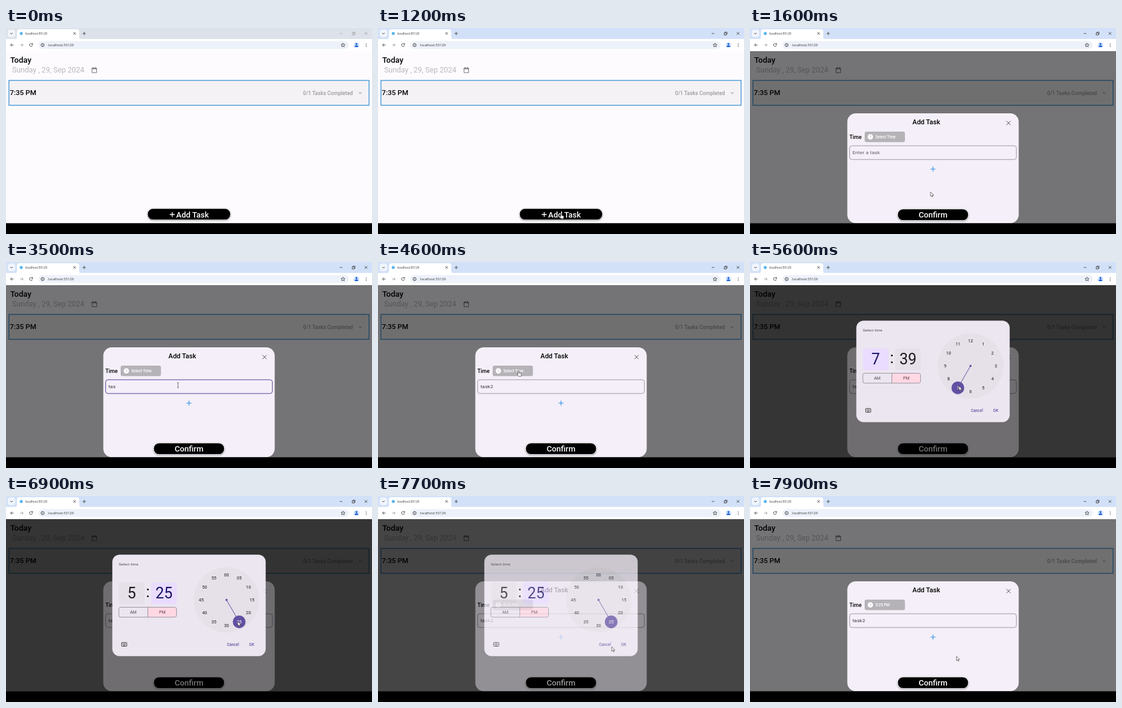
These frames come from a looping animation (600x338 px, 8 s). An HTML page:

```html
<!DOCTYPE html>
<html lang="en">
<head>
<meta charset="utf-8">
<style>
  html, body { margin: 0; width: 100%; height: 100%; overflow: hidden; background: #000; }
  svg { display: block; width: 600px; height: 338px; font-family: Roboto, sans-serif; }
  .medium { font-weight: 500; }
  .mid { text-anchor: middle; }
  .ui { font-family: "Open Sans", sans-serif; fill: #333; }
  .line { fill: none; stroke: #444; stroke-width: .9; }
  .field { font-size: 8px; letter-spacing: .25px; }
  .big { font-size: 25px; text-anchor: middle; }
  #dial text { font-size: 7.3px; text-anchor: middle; }
</style>
</head>
<body>
<svg viewBox="0 0 600 338">
  <defs>
    <clipPath id="page"><rect y="38" width="600" height="282.5"/></clipPath>
    <filter id="shadow" x="-10%" y="-30%" width="120%" height="170%">
      <feDropShadow dx="0" dy=".8" stdDeviation=".9" flood-opacity=".45"/>
    </filter>
  </defs>

  <!-- Browser window -->
  <rect id="strip" width="600" height="19"/>
  <rect x="3" y="2.5" width="12" height="12.5" rx="4" fill="#fff" fill-opacity=".65"/>
  <path class="line" d="M7 8l2 2 2-2"/>
  <path d="M14 18.5q4 0 4-4v-8.500q0-4 4-4h94q4 0 4 4v8.500q0 4 4 4z" fill="#fff"/>
  <circle cx="25" cy="9" r="2.500" fill="#52b4ee"/>
  <text class="ui" x="31.500" y="10.800" font-size="4.950">localhost:55129</text>
  <path class="line" d="M110.500 7l3.800 3.800m0-3.800l-3.800 3.800M125.500 9h5.400m-2.700-2.700v5.400"/>
  <g id="windowButtons" fill="none" stroke-width=".7">
    <path d="M547 9h4.500M588 6.700l4.400 4.400m0-4.400l-4.400 4.400"/>
    <path d="M567.500 8h3.500v3.500h-3.500zM568.700 8v-1.200h3.500v3.500h-1.200"/>
  </g>
  <rect y="18" width="600" height="20.500" fill="#fff"/>
  <rect x="53" y="21.500" width="509" height="13" rx="6.500" fill="#edf1f9"/>
  <path class="line" d="M12.500 28h-5m2.300-2.400l-2.400 2.400 2.400 2.400"/>
  <path class="line" stroke-opacity=".5" d="M23 28h5m-2.300-2.400l2.400 2.400-2.400 2.400"/>
  <path class="line" d="M43.300 26.600a2.500 2.500 0 1 0 .2 2M43.700 25v2h-2"/>
  <circle class="line" cx="60" cy="28" r="2.600" stroke-width=".6"/>
  <path class="line" stroke-width=".7" d="M60 27.500v2M60 26.200v.6"/>
  <text class="ui" x="69" y="30" font-size="5.750">localhost:55129</text>
  <path class="line" stroke-width=".7" d="M552.500 24.800l.9 2.100 2.300.2-1.700 1.500.5 2.300-2-1.200-2 1.200.5-2.300-1.700-1.500 2.300-.2z"/>
  <circle cx="574.500" cy="28" r="4.800" fill="#d3e3fd"/>
  <circle cx="574.500" cy="26.300" r="1.500" fill="#0b57d0"/>
  <path d="M571.500 31q0-2.500 3-2.500t3 2.500z" fill="#0b57d0"/>
  <path d="M590.500 25.400v6" stroke="#444" stroke-width="1.200" stroke-dasharray="1.100 1.200"/>

  <!-- Task list -->
  <g clip-path="url(#page)">
    <rect y="38" width="600" height="283" fill="#fefbff"/>
    <text class="medium" x="7" y="56.700" font-size="13">Today</text>
    <text x="10" y="73.300" font-size="12.200" fill="#bbb9bc">Sunday , 29, Sep 2024</text>
    <path d="M141 66h7.600v7.300h-7.600z" fill="none" stroke="#777"/>
    <path d="M140.500 66.800h8.600M142.800 64.300v2M146.800 64.300v2" fill="none" stroke="#777" stroke-width="1.500"/>
    <rect x="4.800" y="86" width="590.400" height="40.800" fill="#f5f2f5" stroke="#4a9bd6" stroke-width="1.400"/>
    <text class="medium" x="6.300" y="110.200" font-size="11.600">7:35 PM</text>
    <text class="medium" x="487" y="109.500" font-size="8.600" fill="#9b999c">0/1 Tasks Completed</text>
    <path d="M578.500 105.500l2.200 2.200 2.200-2.200" fill="none" stroke="#777"/>
    <rect x="232" y="296.300" width="136" height="18.500" rx="9" stroke="#e2e0e2" stroke-width=".8" filter="url(#shadow)"/>
    <path d="M268.500 306h8m-4-4v8" stroke="#fff" stroke-width="1.300"/>
    <text class="medium" x="279" y="310.700" font-size="13" fill="#fff">Add Task</text>
    <rect id="sheetScrim" y="38" width="600" height="283"/>

    <!-- New task sheet -->
    <g id="sheet">
      <rect x="159.500" y="140" width="281" height="180.300" rx="14" fill="#f4eff8"/>
      <text class="medium mid" x="289" y="157.800" font-size="11">Add Task</text>
      <path class="line" d="M420.500 152.700l6.600 6.600m0-6.600l-6.600 6.600"/>
      <text class="medium" x="163" y="181.800" font-size="8.800">Time</text>
      <rect x="188" y="170" width="66" height="17.300" rx="3" fill="#b6b3b8"/>
      <circle cx="197.300" cy="178.600" r="4.400" fill="#fff"/>
      <path d="M197.300 176v2.800l1.700 1.200" fill="none" stroke="#b6b3b8" stroke-width=".8"/>
      <text id="chosenTime" class="medium" x="205.500" y="180.900" font-size="6.300" fill="#fff"></text>
      <rect id="fieldBox" x="163.300" y="193.200" width="273.400" height="22.600" rx="4" fill="none"/>
      <text id="fieldText" class="field" x="168" y="207.400"></text>
      <rect id="caret" y="199.500" width=".9" height="10" fill="#6750a4"/>
      <path d="M296 231.500h8m-4-4v8" stroke="#3293e6" stroke-width="1.200"/>
      <rect x="242" y="297" width="116" height="18.800" rx="9" stroke="#fff" stroke-width=".8" filter="url(#shadow)"/>
      <text class="medium mid" x="300" y="311.400" font-size="13.200" fill="#fff">Confirm</text>
    </g>

    <!-- Time picker -->
    <g id="picker">
      <rect y="38" width="600" height="283" fill-opacity=".54"/>
      <rect x="174.300" y="96.300" width="251.400" height="166.400" rx="12" fill="#ece6f0"/>
      <text x="185" y="113.500" font-size="6.200" letter-spacing=".1" fill="#49454f">Select time</text>
      <rect id="hourBox" x="185" y="142" width="42" height="35.500" rx="3.500"/>
      <rect id="minuteBox" x="238" y="142" width="42" height="35.500" rx="3.500"/>
      <text id="hour" class="big" x="206" y="168.300"></text>
      <text class="big" x="232.500" y="165.500">:</text>
      <text id="minute" class="big" x="259" y="168.300"></text>
      <path d="M232.500 182.500h44q3 0 3 3v10q0 3-3 3h-44z" fill="#ffd8e4"/>
      <rect x="185" y="182.500" width="94.500" height="16.300" rx="3" fill="none" stroke="#79747e" stroke-width=".7"/>
      <path d="M232.500 182.500v16.300" stroke="#79747e" stroke-width=".7"/>
      <text class="mid" x="208.500" y="193.200" font-size="7" fill="#49454f">AM</text>
      <text class="mid" x="256.300" y="193.200" font-size="7" fill="#633b48">PM</text>
      <circle cx="361.500" cy="170.500" r="53.700" fill="#e6e0e9"/>
      <path id="hand" stroke="#6250a3"/>
      <circle cx="361.500" cy="170.500" r="1.800" fill="#6250a3"/>
      <circle id="knob" r="10.500" fill="#6250a3"/>
      <g id="dial"></g>
      <rect x="189.500" y="240.300" width="8.500" height="6.300" rx=".8" fill="none" stroke="#333" stroke-width=".9"/>
      <path d="M191 242.200h5.600M191 243.700h5.600" stroke="#333" stroke-dasharray=".9 .6"/>
      <path d="M192 245.300h3.600" stroke="#333" stroke-width=".8"/>
      <rect id="okHover" x="391.500" y="235" width="22" height="17" rx="8.500" fill="#6750a4" fill-opacity=".08"/>
      <g class="medium mid" font-size="6.400" fill="#6750a4">
        <text x="372" y="245.700">Cancel</text>
        <text x="402.800" y="245.700">OK</text>
      </g>
    </g>
  </g>
  <rect y="320.500" width="600" height="18"/>

  <g id="pointer" stroke="#222" stroke-width=".6" stroke-linejoin="round">
    <path id="arrow" fill="#fff" d="M0 0v7.200l1.700-1.500 1.100 2.500 1.200-.5-1.100-2.500h2.300z"/>
    <path id="finger" fill="#fff" d="M-.8.5q.8-1 1.600 0v3l3 .7q.9.300.8 1.300l-.6 3.500h-4l-2.600-3.500q.4-1 1.800 0z"/>
    <path id="beam" fill="none" d="M-1.300-4h2.600M0-4v8M-1.300 4h2.600"/>
  </g>
</svg>

<script>
const LOOP = 8000;
const $ = id => document.getElementById(id);
const set = (id, attrs) => {
  for (const key in attrs) $(id).setAttribute(key, attrs[key]);
};
const write = (id, text) => {
  if ($(id).textContent !== text) $(id).textContent = text;
};
const show = (id, on) => set(id, { visibility: on ? "visible" : "hidden" });
const progress = (t, from, to) => Math.min(1, Math.max(0, (t - from) / (to - from)));
const smooth = p => p * p * (3 - 2 * p);
const within = (t, from, to) => t >= from && t < to;

// Rows are [time, ...values]; values ease from one row to the next.
function track(rows, t) {
  const next = rows.findIndex(row => row[0] > t);
  if (next < 0) return rows[rows.length - 1].slice(1);
  if (next === 0) return rows[0].slice(1);
  const a = rows[next - 1], b = rows[next];
  const p = smooth(progress(t, a[0], b[0]));
  return a.slice(1).map((v, i) => v + (b[i + 1] - v) * p);
}

const pointerPath = [
  [500, 430, -15], [900, 345, 225], [1150, 300, 304], [1250, 300, 304],
  [1500, 296, 270], [1600, 296, 269], [1800, 294, 253], [2200, 286, 166],
  [2600, 282, 202], [4000, 282, 202], [4450, 230.500, 178.500], [4880, 230.500, 178.500],
  [5200, 290, 158], [5600, 342.500, 203.500], [5700, 342.500, 203.500], [5800, 342, 205.500],
  [5950, 342, 205.500], [6250, 380, 206], [6950, 380, 206], [7250, 402, 241],
  [7600, 402, 241], [7880, 338.500, 263]
];
const handAngles = [
  [6300, 210], [6430, 150], [6470, 150], [6660, 234], [6740, 234], [6880, 150]
];
const typed = [[3100, "t"], [3200, "ta"], [3300, "tas"], [3600, "task"], [4000, "task2"]];

const polar = (degrees, radius) => {
  const a = degrees * Math.PI / 180;
  return [361.5 + radius * Math.sin(a), 170.5 - radius * Math.cos(a)];
};

const labels = Array.from({ length: 12 }, (_, i) => {
  const label = document.createElementNS("http://www.w3.org/2000/svg", "text");
  const [x, y] = polar(i * 30, 41.5);
  label.setAttribute("x", x);
  label.setAttribute("y", y + 2.6);
  return $("dial").appendChild(label);
});

function drawField(t) {
  const focused = within(t, 2650, 4550);
  const entry = typed.filter(([time]) => t >= time).pop();
  write("fieldText", entry ? entry[1] : "Enter a task");
  set("fieldText", { fill: entry ? "#37333c" : "#5b5761" });
  set("fieldBox", {
    stroke: focused ? "#55439a" : "#79747e",
    "stroke-width": focused ? 1 : .7
  });
  const caretOn = within(t, 2700, 2900) || within(t, 3100, 3500) ||
    within(t, 3600, 3800) || within(t, 4000, 4400);
  show("caret", caretOn);
  set("caret", { x: 168 + (entry ? $("fieldText").getComputedTextLength() : 0) });
}

function drawPicker(t) {
  const opacity = progress(t, 4640, 4790) * (1 - progress(t, 7650, 7850));
  set("picker", { opacity });
  const minutes = t >= 6450;
  const [angle] = track(handAngles, t);
  const [x, y] = polar(angle, 41.5);
  write("hour", t < 6300 ? "7" : "5");
  write("minute", t < 6750 ? "39" : "25");
  for (const [name, active] of [["hour", !minutes], ["minute", minutes]]) {
    set(name, { fill: active ? "#1a1466" : "#1d1b20" });
    set(name + "Box", { fill: active ? "#e9dcff" : "#e6e0e9" });
  }
  set("hand", { d: `M361.5 170.5L${x} ${y}` });
  set("knob", { cx: x, cy: y });
  labels.forEach((label, i) => {
    label.textContent = minutes ? String(i * 5).padStart(2, "0") : i || 12;
    const offset = Math.abs(angle - i * 30);
    label.setAttribute("fill", offset < 9 ? "#fff" : "#1d1b20");
  });
  show("okHover", within(t, 7180, 7650));
}

function drawPointer(t) {
  const [x, y] = track(pointerPath, t);
  const finger = within(t, 1080, 1350) || within(t, 4350, 4700) || within(t, 7180, 7680);
  const beam = within(t, 2480, 4200);
  set("pointer", { transform: `translate(${x} ${y})` });
  show("finger", finger);
  show("beam", beam);
  show("arrow", t >= 500 && !finger && !beam);
}

function draw(t) {
  const active = t >= 400;
  set("strip", { fill: active ? "#d3e1f8" : "#dde2ea" });
  set("windowButtons", { stroke: active ? "#222" : "#999" });
  const open = progress(t, 1250, 1500);
  set("sheetScrim", { opacity: .54 * open });
  set("sheet", { transform: `translate(0 ${182 * (1 - open) ** 3})` });
  write("chosenTime", t < 7650 ? "Select Time" : "5:25 PM");
  drawField(t);
  drawPicker(t);
  drawPointer(t);
}

function tick() {
  draw(performance.now() % LOOP);
  requestAnimationFrame(tick);
}
tick();
</script>
</body>
</html>
```
